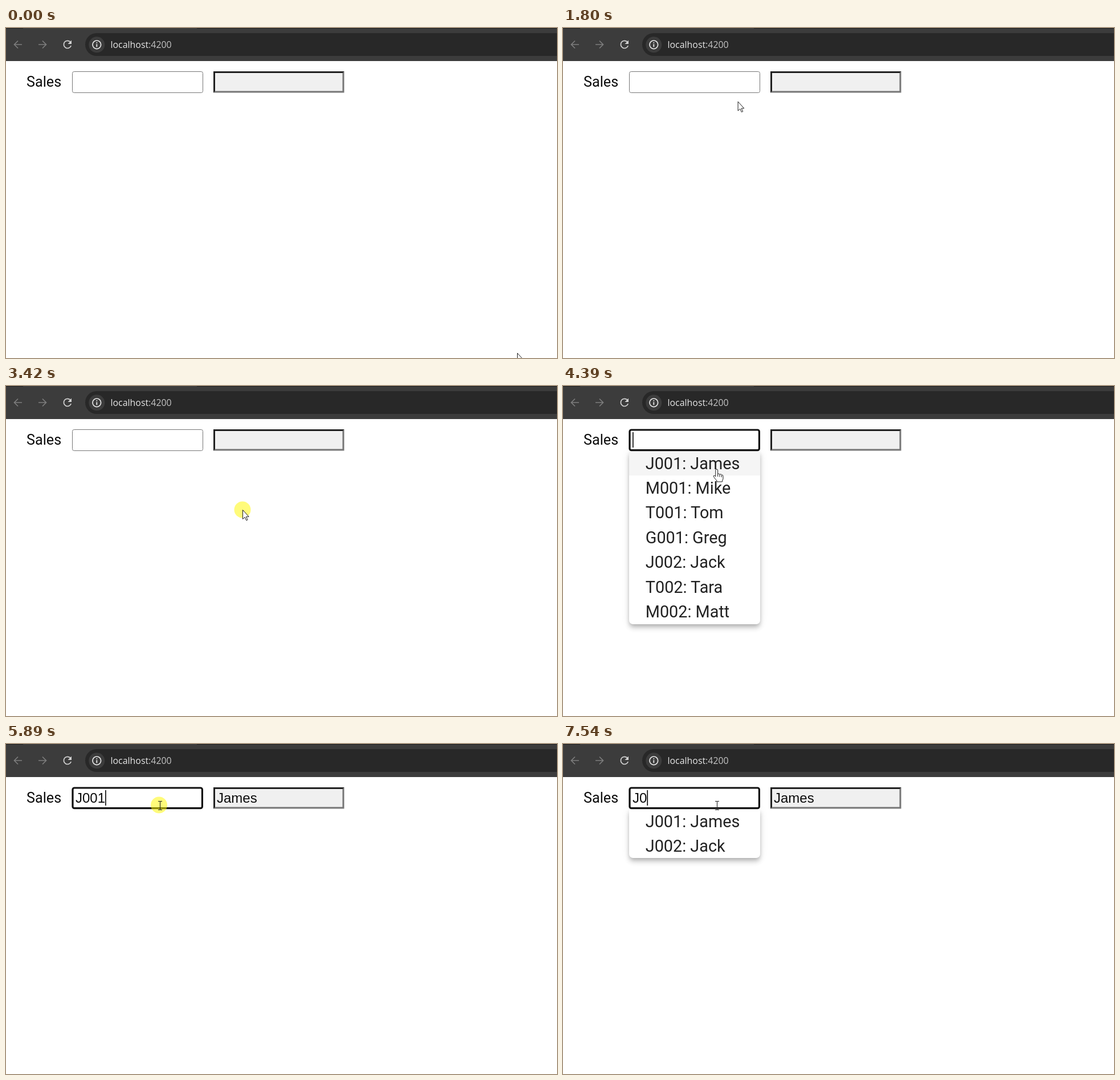
An HTML page that plays this animation: 967x579 px, repeating every 8 s.

```html
<!DOCTYPE html>
<html lang="en">
<head>
<meta charset="utf-8">
<title>Autocomplete</title>
<style>
  html, body { margin: 0; width: 100%; height: 100%; overflow: hidden; background: #fff; }
  #panel, svg { position: absolute; }
  #panel {
    left: 116px; top: 113.6px; width: 229.5px; overflow: hidden;
    background: #fff; border-radius: 0 0 7px 7px; transform-origin: top center;
    font: 28.8px/45.2px Roboto, sans-serif; color: rgba(0, 0, 0, .87);
    box-shadow: 0 3.6px 7.2px -1.8px rgba(0, 0, 0, .2), 0 7.2px 9px rgba(0, 0, 0, .14),
      0 1.8px 16px rgba(0, 0, 0, .08);
  }
  #panel div { height: 43.45px; padding-left: 28.8px; white-space: nowrap; }
  #panel div.hover { background: #f5f5f5; }
  svg { left: 0; top: 0; }
  .value { font: 24px "Liberation Sans", Arial, sans-serif; }
  .line { fill: none; stroke-width: 1.7; }
  .pointer { fill: #fff; stroke: #1c1c1c; stroke-linejoin: round; }
</style>
</head>
<body>
<div id="panel"></div>
<svg width="967" height="579" viewBox="0 0 967 579">
  <rect width="967" height="58" fill="#3c3c3c"/>
  <path d="M0 0H30V1H0ZM335 0H967V1H335Z" fill="#1f1f1f"/>
  <rect x="139" y="9" width="860" height="40" rx="20" fill="#282828"/>
  <path class="line" stroke="#7d7d7d" d="M28 29H15M21 22.5L14.5 29L21 35.5M57 29H70M64 22.5L70.5 29L64 35.5"/>
  <path class="line" stroke="#d2d2d2" d="M112.8 24.4A6.6 6.6 0 1 0 114.2 31"/>
  <path fill="#d2d2d2" d="M115 21.5V28H108.5Z"/>
  <circle cx="159.3" cy="29.3" r="14" fill="#3c3c3c"/>
  <circle class="line" cx="159.3" cy="29.3" r="7.3" stroke="#e8e8e8"/>
  <path fill="#e8e8e8" d="M158.4 28.2h1.8v5h-1.8zM158.4 25h1.8v1.8h-1.8z"/>
  <text x="183.5" y="35.3" font-family="'Open Sans', 'Noto Sans', sans-serif" font-size="15.9" fill="#e6e6e6">localhost<tspan fill="#c4c4c4">:4200</tspan></text>
  <text x="36" y="102.7" font-family="Roboto, sans-serif" font-size="25.2" fill="#0c0c0c">Sales</text>

  <rect id="border" x="116.5" y="76.5" width="229" height="37" rx="3" fill="#fff" stroke="#767676"/>
  <rect id="ring" x="117" y="77" width="227.4" height="35.7" rx="3" fill="#fff" stroke="#101010" stroke-width="3.2"/>
  <rect x="364" y="76" width="229.5" height="37.5" fill="#767676"/>
  <path d="M364 76H593.5L590.5 79H367V110.5L364 113.5Z" fill="#212121"/>
  <rect x="367" y="79" width="223.5" height="31.5" fill="#f0f0f0"/>

  <rect id="mark" x="122" y="81" height="27" fill="#0078d7"/>
  <text id="codeText" class="value" x="122" y="103.3"></text>
  <text id="nameText" class="value" x="370" y="103.3" fill="#0c0c0c"></text>
  <rect id="caret" y="81" width="1.7" height="27" fill="#111"/>
  <g id="cursor">
    <circle id="halo" r="14.5" fill="rgba(255,248,0,.52)"/>
    <path id="arrow" class="pointer" d="M.5 .5V16.5L4.2 13.2L6.8 18.8L9 17.8L6.5 12.3H11.2Z"/>
    <path id="beam" class="line" stroke="#222" style="stroke-width:1.1" d="M-1.5 -6.5H1.2L2 -6L2.8 -6.5H5.5M2 -6V8M-1.5 8.5H1.2L2 8L2.8 8.5H5.5"/>
    <path id="hand" class="pointer" d="M-.7 1Q-.7 -1 1.2 -1T3.1 1V8Q3.5 6.5 5.1 7Q6.5 7.3 6.5 8.6Q7.5 7.3 8.8 7.8Q9.9 8.2 9.9 9.6Q10.9 8.6 11.9 9.4Q12.5 10 12.5 11.5V15Q12.5 17 11.1 19V21H1.5V19Q-.5 17.5 -4 12.4Q-5 10.6 -3.5 10Q-2.1 9.8 -.7 12ZM3.1 8V12M6.5 8.6V12.5M9.9 9.6V13"/>
  </g>
</svg>
<script>
const LOOP = 8000, STEP = 68, GLIDE = 300, PRESS = 210, BLINK = 530;
const PANEL_TOP = 113.6, ROW = 43.45;
const people = ["J001: James", "M001: Mike", "T001: Tom", "G001: Greg", "J002: Jack", "T002: Tara", "M002: Matt"];

const corner = [897, 570], field = [245.5, 103];
// The pointer leaves for each place at the given time
const glides = [
  [70, field], [1260, [522, 190]], [1670, field],
  [2800, [584, 195]], [3000, [415, 217]], [3490, field],
  [4090, [268.5, 147]], [4870, [568, 175]], [5170, [285, 122]], [5550, [268.5, 107]]
];
const clicks = [720, 1530, 2060, 3220, 3830, 4660, 5820, 5960];
const typing = { at: 6550, gap: 495, text: "J0" };

const $ = id => document.getElementById(id);
const show = (id, on) => { $(id).style.display = on ? "" : "none"; };
const clamp = v => Math.max(0, Math.min(1, v));
const easeOut = (p, power) => 1 - (1 - clamp(p)) ** power;

// Eased glide along a slightly sagging line, in discrete steps
function pointerAt(t) {
  const i = glides.filter(g => g[0] <= t).length - 1;
  if (i < 0) return corner;
  const [start, [x1, y1]] = glides[i];
  const [x0, y0] = i ? glides[i - 1][1] : corner;
  const steps = Math.floor((t - start) / STEP) + 1;
  const p = easeOut(steps * STEP / GLIDE, 2.5);
  const sag = 0.035 * Math.hypot(x1 - x0, y1 - y0) * Math.sin(Math.PI * p);
  return [x0 + (x1 - x0) * p, y0 + (y1 - y0) * p + sag];
}

function zone([x, y], panelHeight) {
  if (x < 116 || x > 346 || y < 76) return "page";
  if (y < PANEL_TOP) return "field";
  return y < PANEL_TOP + panelHeight ? "row" : "page";
}

function stateAt(t) {
  const s = { focus: false, open: false, changed: -Infinity, text: "", name: "", selected: false };
  let last = -Infinity;
  for (const at of clicks.filter(c => c <= t)) {
    const spot = zone(pointerAt(at), s.open ? people.length * ROW : 0);
    const inField = spot === "field";
    s.selected = inField && at - last < PRESS;
    s.focus = spot !== "page";
    if (s.open !== inField) {
      s.open = inField;
      s.changed = at + (inField ? 140 : 70);
    }
    if (spot === "row" && t >= s.changed) [s.text, s.name] = people[0].split(": ");
    last = at;
  }
  if (t >= typing.at) {
    s.text = typing.text.slice(0, Math.floor((t - typing.at) / typing.gap));
    s.selected = false;
  }
  return s;
}

// Any pointer or key action makes the caret solid again
function caretOn(t) {
  const keys = [...typing.text, ""].map((_, i) => typing.at + i * typing.gap);
  const acts = [...clicks, ...glides.map(g => g[0]), ...keys].filter(a => a <= t);
  return Math.floor((t - Math.max(...acts)) / BLINK) % 2 === 0;
}

let listed;
function drawPanel(t, s) {
  const age = t - s.changed;
  const grow = s.open ? easeOut(age / 120, 3) : 1;
  const alpha = s.open ? grow : 1 - clamp(age / 100);
  show("panel", alpha > 0);
  if (alpha <= 0) return 0;
  const rows = people.filter(p => p.startsWith(s.text));
  if (listed !== rows.join()) {
    listed = rows.join();
    $("panel").replaceChildren(...rows.map(r => Object.assign(document.createElement("div"), { textContent: r })));
  }
  $("panel").style.opacity = alpha;
  $("panel").style.transform = `scaleY(${0.8 + 0.2 * grow})`;

  // Hover follows half a step behind the pointer
  const height = rows.length * ROW;
  const [x0, y0] = pointerAt(t - STEP), [x1, y1] = pointerAt(t);
  const mid = [(x0 + x1) / 2, (y0 + y1) / 2];
  const hovered = zone(mid, height) === "row" ? Math.floor((mid[1] - PANEL_TOP) / ROW) : -1;
  [...$("panel").children].forEach((row, i) => { row.className = i === hovered ? "hover" : ""; });
  return height;
}

function draw(t) {
  const s = stateAt(t);
  const spot = zone(pointerAt(t), drawPanel(t, s));

  show("ring", s.focus);
  show("border", !s.focus);
  $("codeText").textContent = s.text;
  $("codeText").setAttribute("fill", s.selected ? "#fff" : "#0c0c0c");
  $("nameText").textContent = s.name;
  const width = s.text ? $("codeText").getComputedTextLength() : 0;
  $("mark").setAttribute("width", s.selected ? width : 0);
  $("caret").setAttribute("x", 122 + width);
  show("caret", s.focus && !s.selected && caretOn(t));

  $("cursor").setAttribute("transform", `translate(${pointerAt(t).join(" ")})`);
  show("beam", spot === "field");
  show("hand", spot === "row");
  show("arrow", spot === "page");
  show("halo", clicks.some(c => t >= c && t < c + PRESS));
}

const start = performance.now();
function frame() {
  draw((performance.now() - start) % LOOP);
  requestAnimationFrame(frame);
}
frame();
</script>
</body>
</html>
```
